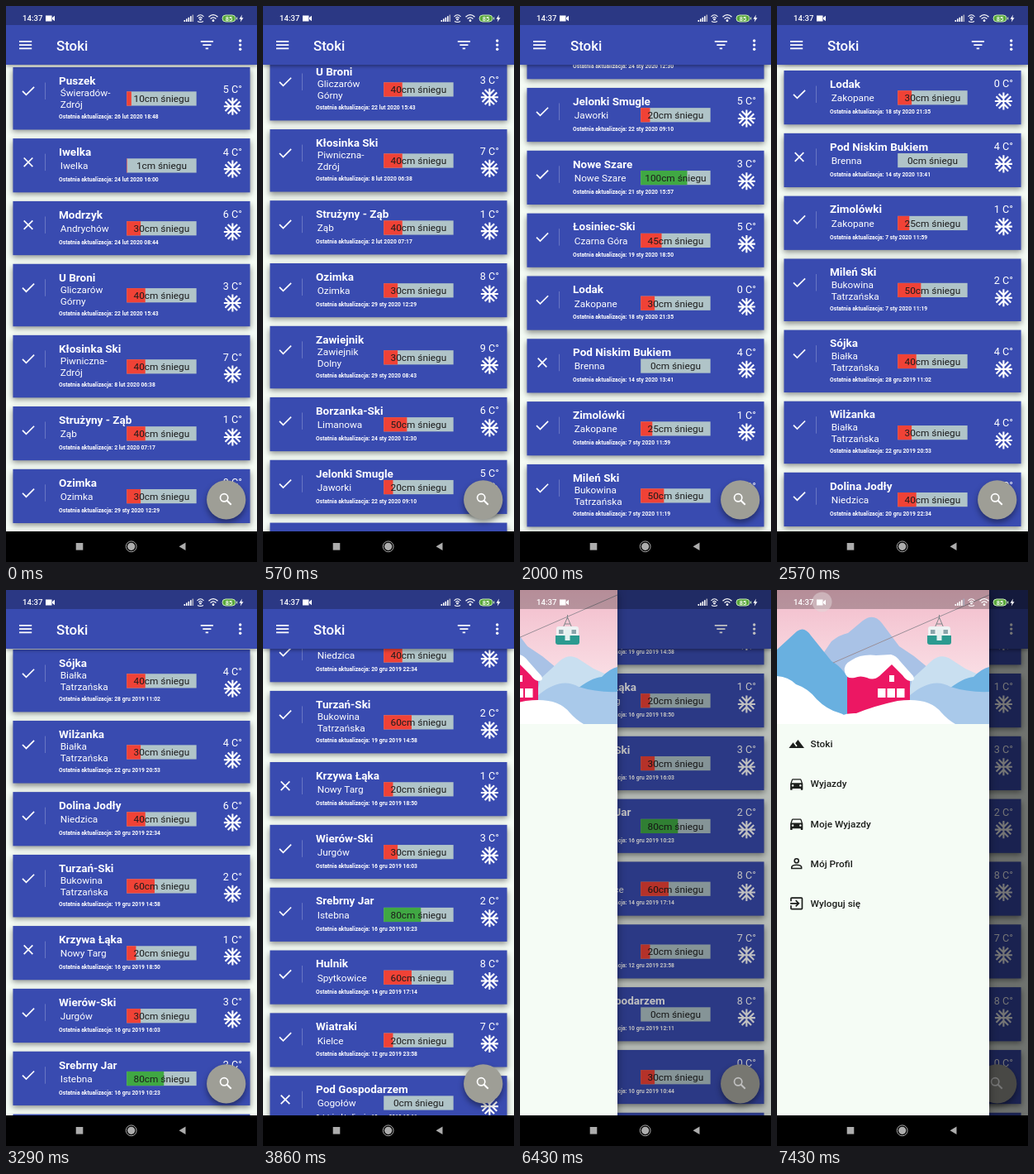
An HTML page with a canvas for the animation above (8 s loop, 304 px wide and 672 px high).

```html
<!DOCTYPE html>
<html lang="pl">
<head>
<meta charset="utf-8">
<title>Stoki</title>
<style>
html, body { margin: 0; height: 100%; overflow: hidden; background: #000; }
canvas { display: block; width: 304px; height: 672px; }
</style>
</head>
<body>
<canvas id="stage"></canvas>
<script>
const W = 304, H = 672, LOOP = 8000, FPS = 7;
const DP = W / 360;
const NAV_Y = 635, STATUS_H = 23, BAR_BOTTOM = 71, DRAWER_W = 257;
const BLUE = '#394bb0', PAPER = '#f5fcf5';

const canvas = document.getElementById('stage');
const ctx = canvas.getContext('2d');
const ratio = window.devicePixelRatio || 1;
canvas.width = W * ratio;
canvas.height = H * ratio;

// name | town (slash breaks the line) | snow cm | temperature | updated | closed
const slopes = `Puszek|Świeradów-/Zdrój|10|5|26 lut 2020 18:48
Iwelka|Iwelka|1|4|24 lut 2020 16:00|x
Modrzyk|Andrychów|30|6|24 lut 2020 08:44|x
U Broni|Gliczarów/Górny|40|3|22 lut 2020 15:43
Kłosinka Ski|Piwniczna-/Zdrój|40|7|8 lut 2020 06:38
Strużyny - Ząb|Ząb|40|1|2 lut 2020 07:17
Ozimka|Ozimka|30|8|29 sty 2020 12:29
Zawiejnik|Zawiejnik/Dolny|30|9|29 sty 2020 08:43
Borzanka-Ski|Limanowa|50|6|24 sty 2020 12:30
Jelonki Smugle|Jaworki|20|5|22 sty 2020 09:10
Nowe Szare|Nowe Szare|100|3|21 sty 2020 15:57
Łosiniec-Ski|Czarna Góra|45|5|19 sty 2020 18:50
Lodak|Zakopane|30|0|18 sty 2020 21:35
Pod Niskim Bukiem|Brenna|0|4|14 sty 2020 13:41|x
Zimolówki|Zakopane|25|1|7 sty 2020 11:59
Mileń Ski|Bukowina/Tatrzańska|50|2|7 sty 2020 11:19
Sójka|Białka/Tatrzańska|40|4|28 gru 2019 11:02
Wilżanka|Białka/Tatrzańska|30|4|22 gru 2019 20:53
Dolina Jodły|Niedzica|40|6|20 gru 2019 22:34
Turzań-Ski|Bukowina/Tatrzańska|60|2|19 gru 2019 14:58
Krzywa Łąka|Nowy Targ|20|1|16 gru 2019 18:50|x
Wierów-Ski|Jurgów|30|3|16 gru 2019 16:03
Srebrny Jar|Istebna|80|2|16 gru 2019 10:23
Hulnik|Spytkowice|60|8|14 gru 2019 17:14
Wiatraki|Kielce|20|7|12 gru 2019 23:58
Pod Gospodarzem|Gogołów|0|8|10 gru 2019 12:11|x
Hulajka|Zieleniec|30|0|10 gru 2019 10:44
Zaspa|Korbielów|20|1|9 gru 2019 09:20`.split('\n').map(line => {
  const [name, town, snow, temp, date, closed] = line.split('|');
  return { name, towns: town.split('/'), snow: +snow, temp, date, closed };
});

// [step, value] keys
const scrollKeys = [[0, 0], [8, 471.8], [14, 698.6], [23, 1266.7], [31, 1570.5], [33, 1571.8]];
const drawerKeys = [[42, 0], [43, 15], [44, 55], [45, 118], [46, 200], [47, 241], [48, 255], [49, 257]];

// Monotone cubic through the keys
function follow(keys, x) {
  const last = keys.length - 1;
  if (x <= keys[0][0]) return keys[0][1];
  if (x >= keys[last][0]) return keys[last][1];
  const i = keys.findIndex(k => k[0] > x) - 1;
  const rise = j => (keys[j + 1][1] - keys[j][1]) / (keys[j + 1][0] - keys[j][0]);
  const slope = j => {
    if (j === 0) return rise(0);
    if (j === last) return 0;
    const a = rise(j - 1), b = rise(j);
    return 2 * a * b / (a + b);
  };
  const [x0, y0] = keys[i], [x1, y1] = keys[i + 1];
  const d = x1 - x0, u = (x - x0) / d, v = 1 - u;
  return y0 * v * v * (1 + 2 * u) + y1 * u * u * (1 + 2 * v)
    + d * u * v * (slope(i) * v - slope(i + 1) * u);
}

function rect(color, x, y, w, h) {
  ctx.fillStyle = color;
  ctx.fillRect(x, y, w, h);
}
function disc(color, x, y, r) {
  ctx.fillStyle = color;
  ctx.beginPath();
  ctx.arc(x, y, r, 0, 7);
  ctx.fill();
}
function shape(color, path) {
  ctx.fillStyle = color;
  ctx.fill(new Path2D(path), 'evenodd');
}
function stroke(color, width, path) {
  ctx.strokeStyle = color;
  ctx.lineWidth = width;
  ctx.stroke(new Path2D(path));
}
// y is the middle of the capitals
function text(str, x, y, size, color = '#fff', weight = 400, align = 'left') {
  ctx.font = `${weight} ${size}px Roboto, sans-serif`;
  ctx.textAlign = align;
  ctx.fillStyle = color;
  ctx.fillText(str, x, y + size * 0.355);
}
function at(x, y, scale, draw) {
  ctx.save();
  ctx.translate(x, y);
  ctx.scale(scale, scale);
  draw();
  ctx.restore();
}
function shadowed(blur, dy, alpha, draw) {
  ctx.save();
  ctx.shadowColor = `rgba(0,0,0,${alpha})`;
  ctx.shadowBlur = blur * ratio;
  ctx.shadowOffsetY = dy * ratio;
  draw();
  ctx.restore();
}

function snowflake() {
  for (let i = 0; i < 4; i++) {
    stroke('#fff', 2, 'M0 0V-10M-5.4 -8.4L0 -3L5.4 -8.4');
    ctx.rotate(Math.PI / 2);
  }
}

function card(slope, y) {
  const extra = slope.towns.length > 1 ? 10.27 : 0;
  const height = 65.2 + extra;
  if (y > -height && y < H) {
    shadowed(7, 3, 0.45, () => rect(BLUE, 8.44, y, W - 16.88, height));
    at(27, y + 28.7, DP, () => stroke('#fff', 2,
      slope.closed ? 'M-6.3 -6.3L6.3 6.3M6.3 -6.3L-6.3 6.3' : 'M-8.3 .3L-3 5.6L8.4 -5.8'));
    rect('rgba(255,255,255,.24)', 47, y + 18.5, 1, 20.5);
    text(slope.name, 64, y + 16, 16 * DP, '#fff', 700);
    slope.towns.forEach((town, i) =>
      text(town, 65.7, y + (extra ? 31.2 + 13.8 * i : 33), 14 * DP));
    text('Ostatnia aktualizacja: ' + slope.date, 64, y + 49.6 + extra, 8 * DP, '#fff', 700);

    const barW = 100 * DP, barY = y + 24.2 + extra / 2;
    rect('#b0c4c8', 146.2, barY, barW, 17.2);
    rect(slope.snow < 80 ? '#f04236' : '#40a843', 146.2, barY, barW * slope.snow / 150, 17.2);
    text(slope.snow + 'cm śniegu', 188.4, barY + 8.8, 14 * DP, '#1c1c1c', 400, 'center');

    text(slope.temp + ' C°', 274.3, y + 16 + extra, 15 * DP, '#fff', 400, 'center');
    at(274.4, y + 37 + extra, 1.055, snowflake);
  }
  return y + height + 10.63;
}

function appBar() {
  shadowed(4, 2, 0.35, () => rect(BLUE, 0, 0, W, BAR_BOTTOM));
  at(23.6, 47.1, DP, () => stroke('#fff', 2, 'M-9 -5H9M-9 0H9M-9 5H9'));
  text('Stoki', 61, 47.6, 20 * DP, '#fff', 500);
  at(243.4, 47.1, DP, () => stroke('#fff', 2, 'M-9 -5H9M-6 0H6M-2 5H2'));
  for (const dy of [-5.1, 0, 5.1]) disc('#fff', 283.7, 47.1 + dy, 1.7);
}

function searchButton() {
  shadowed(7, 4, 0.4, () => disc('#9e9e96', 266.7, 596.8, 28 * DP));
  at(266.3, 596.4, DP, () => {
    stroke('#fff', 2, 'M-8 -2.5a5.5 5.5 0 1 0 11 0a5.5 5.5 0 1 0 -11 0');
    stroke('#fff', 2.4, 'M1.6 1.6L7.6 7.6');
  });
}

function landscape() {
  ctx.save();
  ctx.beginPath();
  ctx.rect(0, 0, DRAWER_W, 162);
  ctx.clip();
  const sky = ctx.createLinearGradient(0, 0, 0, 110);
  sky.addColorStop(0, '#f2bccb');
  sky.addColorStop(1, '#fae0e6');
  rect(sky, 0, 0, DRAWER_W, 162);

  // Mountains, far to near
  shape('#a9c2e6', 'M40 100L66 62Q76 54 86 52L104 37Q117 27 127 40L148 68L166 80L200 108L257 140V162H40Z');
  shape('#c9dff0', 'M164 107L188 85Q199 76 211 84L228 95L257 108V162H150Z');
  shape('#6fb3e2', 'M205 122Q225 106 238 105Q248 95 257 93V162H180Z');
  shape('#a9c9ea', 'M160 128Q188 104 210 117Q232 124 257 123V162H160Z');
  shape('#69b0e0', 'M0 72L24 50Q33 43 41 55L66 86Q84 96 92 120L120 162H0Z');
  stroke('#9a8f98', 1, 'M68 88L257 6');
  shape('#fff', 'M0 104Q14 105 23 114Q38 119 48 132Q60 144 74 148Q84 150 92 162H0Z');

  // House
  shape('#ec1763', 'M85 100L138 82L161 106V152H85Z');
  shape('#fff', 'M82 99Q80 90 90 85Q102 77 120 79L138 78Q144 79 149 86L165 104Q168 110 161 110Q156 109 152 103L139 90L124 104Q117 110 109 106Q101 103 94 106Q84 108 82 99Z');
  for (const x of [122, 133.5, 145]) rect('#fff', x, 119, 9.5, 11);
  rect('#fff', 136, 103, 6, 8);
  shape('#fff', 'M62 162Q76 148 96 149Q118 140 146 134Q184 129 199 148Q207 157 216 162Z');

  // Gondola
  stroke('#7e8588', 1, 'M196.5 30V35M196.5 33L191 46M196.5 33L202 46M193 41H200');
  shape('#eef2f3', 'M186 44H207Q210 44 210 47V58H183V47Q183 44 186 44Z');
  shape('#2b9a90', 'M182 55H211V63Q211 66 208 66H185Q182 66 182 63Z');
  for (const x of [186, 201.5]) rect('#8aa5ab', x, 48, 5.5, 5);
  rect('#e3f0ef', 193.5, 48, 6, 13);
  ctx.restore();
}

const INK = '#1d1f1d';
const car = () => shape(INK, 'M18.9 6Q18.5 5 17.5 5H6.5Q5.5 5 5.1 6L3 12V20Q3 21 4 21H5Q6 21 6 20V19H18V20Q18 21 19 21H20Q21 21 21 20V12ZM6.5 16a1.5 1.5 0 1 1 .01 0ZM17.5 16a1.5 1.5 0 1 1 .01 0ZM5 11L6.5 6.5H17.5L19 11Z');
const menu = [
  ['Stoki', () => shape(INK, 'M14 6L10.2 11L13.1 14.8L11.5 16L7 10L1 18H23Z')],
  ['Wyjazdy', car],
  ['Moje Wyjazdy', car],
  ['Mój Profil', () => stroke(INK, 1.9, 'M9 8a3 3 0 1 0 6 0a3 3 0 1 0 -6 0M5 19V17Q6 14 12 14Q18 14 19 17V19Z')],
  ['Wyloguj się', () => {
    stroke(INK, 2, 'M4 9V5Q4 4 5 4H19Q20 4 20 5V19Q20 20 19 20H5Q4 20 4 19V15');
    stroke(INK, 2, 'M3 12H15M10.8 7.7L15.1 12L10.8 16.3');
  }],
];

function drawer(open) {
  if (open <= 0) return;
  rect(`rgba(0,0,0,${0.54 * open / DRAWER_W})`, 0, 0, W, NAV_Y);
  ctx.save();
  ctx.translate(open - DRAWER_W, 0);
  shadowed(10, 2, 0.4, () => rect(PAPER, 0, 0, DRAWER_W, NAV_Y));
  landscape();
  menu.forEach(([label, icon], i) => {
    const y = 186 + 48.2 * i;
    at(23.7 - 12 * DP, y - 12 * DP, DP, icon);
    text(label, 40.6, y, 14 * DP, INK, 500);
  });
  ctx.restore();
}

function statusBar(pressed) {
  rect('rgba(0,0,0,.25)', 0, 0, W, STATUS_H);
  if (pressed) disc('rgba(225,215,218,.5)', 54.5, 14.5, 12);
  text('14:37', 20, 15, 9.6, '#fff', 500);
  shape('#fff', 'M48 11.5H55.5V18.5H48ZM56 14L59 11.8V18.2L56 16Z');
  for (let i = 0; i < 5; i++) rect(i < 4 ? '#fff' : '#aab', 215.5 + i * 2.5, 17 - i * 1.6, 1.6, 2 + i * 1.6);
  stroke('#fff', 1.1, 'M231.5 13Q235.5 8.5 239.5 13M233.3 14.8Q235.5 12 237.7 14.8M232 18.5Q235.5 20.5 239 18.5');
  disc('#fff', 235.5, 16.3, 1.3);
  stroke('#fff', 1.3, 'M245.5 13.2Q251 8 256.5 13.2M247.6 15.5Q251 12.3 254.4 15.5');
  disc('#fff', 251, 17.7, 1.4);
  ctx.beginPath();
  ctx.roundRect(262, 11, 16, 8, 4);
  ctx.fillStyle = '#5aa83c';
  ctx.fill();
  ctx.strokeStyle = '#c4e8b4';
  ctx.lineWidth = 1;
  ctx.stroke();
  rect('#c4e8b4', 279, 13.5, 1.2, 3);
  text('85', 270, 15, 7.5, '#fff', 500, 'center');
  shape('#fff', 'M286 10.5L282.5 15.7H284.6L283.8 19.5L287.5 14.2H285.2Z');
}

function navBar() {
  rect('#000', 0, NAV_Y, W, H - NAV_Y);
  const grey = '#adadad';
  rect(grey, 84.7, 649, 8.6, 8.6);
  disc(grey, 151.7, 653.3, 4.6);
  stroke(grey, 1, 'M145.3 653.3a6.4 6.4 0 1 0 12.8 0a6.4 6.4 0 1 0 -12.8 0');
  shape(grey, 'M209.5 653.3L217.5 648.6V658Z');
}

function draw(time) {
  const step = Math.floor(time * FPS / 1000 + 0.04);
  ctx.setTransform(ratio, 0, 0, ratio, 0, 0);
  rect(PAPER, 0, 0, W, H);
  let y = 74 - follow(scrollKeys, step);
  for (const slope of slopes) y = card(slope, y);
  appBar();
  searchButton();
  drawer(follow(drawerKeys, step));
  statusBar(step >= 51);
  navBar();
}

const start = performance.now();
function tick() {
  draw((performance.now() - start) % LOOP);
  requestAnimationFrame(tick);
}
tick();
</script>
</body>
</html>
```
